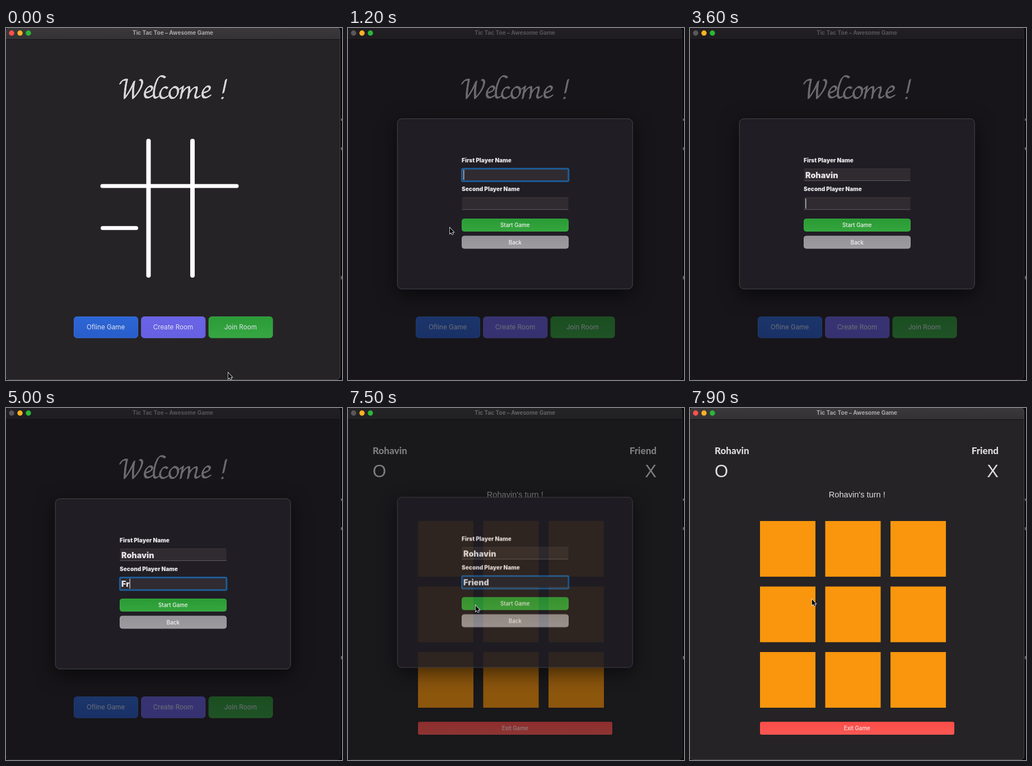
Recreate the animation shown at these times as an HTML page with a canvas. Size 600 by 626 pixels, loop 8000 ms.

```html
<!DOCTYPE html>
<html lang="en">
<head>
<meta charset="utf-8">
<title>Tic Tac Toe</title>
<style>
  html, body { margin: 0; width: 100%; height: 100%; overflow: hidden; background: #000; }
  canvas { display: block; width: 600px; height: 626px; }
</style>
</head>
<body>
<canvas id="stage" role="img" aria-label="Welcome ! Tic Tac Toe"></canvas>
<script>
const W = 600, H = 626, LOOP = 8000, STEP = 100;
const UI = 'Inter, "Open Sans", sans-serif';
const ARIAL = '"Liberation Sans", sans-serif';
const PLAYERS = ['Rohavin', 'Friend'];
const dpr = window.devicePixelRatio || 1;

function setup(canvas) {
  canvas.width = W * dpr;
  canvas.height = H * dpr;
  const c = canvas.getContext('2d');
  c.scale(dpr, dpr);
  return c;
}
const stage = setup(document.getElementById('stage'));
const sheet = setup(document.createElement('canvas'));

const clamp = v => Math.max(0, Math.min(1, v));

function box(c, x, y, w, h, r, fill, stroke) {
  c.beginPath();
  c.roundRect(x, y, w, h, r);
  if (fill) { c.fillStyle = fill; c.fill(); }
  if (stroke) { c.strokeStyle = stroke; c.lineWidth = 1; c.stroke(); }
}

function text(c, str, x, y, font, color, align = 'left') {
  c.font = font;
  c.fillStyle = color;
  c.textAlign = align;
  c.fillText(str, x, y);
}

function shade(c, y, h, top, bottom) {
  const g = c.createLinearGradient(0, y, 0, y + h);
  g.addColorStop(0, top);
  g.addColorStop(1, bottom);
  return g;
}

// Broad-nib lettering
const E = 'M250 115Q262 112 261 106Q259 102 254 105Q247 111 248 119Q250 128 262 120';
const LETTERS = [
  'M204 99Q207 91 216 92Q212 108 212 125Q222 112 229 95Q226 110 227 125Q240 112 243 99Q244 92 239 92',
  E,
  'M284 88Q276 82 271 90Q264 104 264 117Q264 128 272 122',
  'M288 107Q284 103 279 108Q273 116 276 122Q280 128 289 121',
  'M301 105Q292 108 292 117Q293 127 301 124Q309 118 307 109Q305 104 299 105',
  'M311 108L316 104Q314 114 312 125M313 118Q321 104 327 105Q328 110 325 125M326 118Q333 105 340 105Q342 108 338 119Q337 128 346 121',
  'M393 92L388 115M386 124L387 125'
].map(d => new Path2D(d));

function nib(c, path, dx = 0) {
  for (let k = -1; k <= 1; k += 0.25) {
    c.save();
    c.translate(dx + k * 1.2, -k);
    c.stroke(path);
    c.restore();
  }
}

function line(c, x1, y1, x2, y2, w) {
  c.lineWidth = w;
  c.beginPath();
  c.moveTo(x1, y1);
  c.lineTo(x2, y2);
  c.stroke();
}

function welcome(c, t) {
  c.lineCap = c.lineJoin = 'round';
  c.strokeStyle = '#d8d7d9';
  c.lineWidth = 1.2;
  LETTERS.forEach(p => nib(c, p));
  nib(c, LETTERS[1], 103);

  c.strokeStyle = '#fff';
  line(c, 254.5, 201, 254.5, 440, 8);
  line(c, 333, 201, 333, 440, 8);
  line(c, 172, 281, 412, 281, 7);
  line(c, 172.5, 355.8, Math.min(412, 232.5 + t * 0.5), 355.8, 7);

  const items = [
    ['Ofline Game', '#2d67d5', '#285dcb', '#3a70d8'],
    ['Create Room', '#6a64e6', '#6660e2', '#746eea'],
    ['Join Room', '#2b9b37', '#36a743', '#38a544']
  ];
  items.forEach(([label, top, bottom, edge], i) => {
    const x = 121 + i * 120.3;
    box(c, x + 0.5, 513.5, 114, 37.5, 5, shade(c, 513, 38, top, bottom), edge);
    text(c, label, x + 57.2, 536, '400 11.7px ' + UI, '#dfe3ee', 'center');
  });
}

function game(c) {
  const ink = '#dfdee0', names = '800 17px Lato, sans-serif', marks = '31px ' + ARIAL;
  text(c, PLAYERS[0], 44, 82, names, ink);
  text(c, PLAYERS[1], 551, 82, names, ink, 'right');
  text(c, 'O', 44, 123, marks, ink);
  text(c, 'X', 551, 123, marks, ink, 'right');
  text(c, PLAYERS[0] + "'s turn !", 298.3, 159, '14.6px ' + ARIAL, ink, 'center');
  c.fillStyle = '#f9960d';
  for (let i = 0; i < 9; i++)
    c.fillRect(125 + (i % 3) * 116.5, 201 + Math.floor(i / 3) * 116.5, 99, 99);
  box(c, 125, 558, 347, 23, 3, shade(c, 558, 23, '#fb4d49', '#f95853'));
  text(c, 'Exit Game', 298.3, 573.3, '500 9.8px ' + UI, '#f6e6e6', 'center');
}

// [time, letters typed]
const KEYS = [
  [[1200, 0], [2100, 1], [2300, 2], [2500, 3], [2700, 4], [2800, 5], [3000, 6], [3200, 7]],
  [[3600, 0], [4700, 1], [5000, 2], [5500, 3], [5600, 5], [5800, 6], [6000, 6]]
];

function field(c, i, t, focused) {
  const y = 250 + i * 51.3;
  const [last, count] = KEYS[i].filter(k => k[0] <= t).pop() || [t, 0];
  const grow = i ? clamp((t - 3600) / 300) : 1;
  c.fillStyle = '#302b30';
  c.fillRect(203.5, y, 190, 22);
  if (focused && grow > 0) {
    const pad = 7 * (1 - grow);
    c.globalAlpha = grow;
    c.strokeStyle = '#1e5c97';
    c.lineWidth = 3;
    c.beginPath();
    c.roundRect(203.5 - pad, y + 0.2 - pad, 190.3 + 2 * pad, 22.2 + 2 * pad, 2 + pad / 3);
    c.stroke();
    c.globalAlpha = 1;
  } else {
    c.fillStyle = '#3c383d';
    c.fillRect(203.5, y, 190, 1);
    c.fillStyle = '#5c585d';
    c.fillRect(203.5, y + 21, 190, 1);
  }
  const str = PLAYERS[i].slice(0, count);
  text(c, str, 206, y + 17, '900 14.3px ' + UI, '#e4e2e5');
  if (focused && (t - last) % 1000 < 500) {
    c.fillStyle = '#fff';
    c.fillRect(206.3 + c.measureText(str).width, y + 2, 1, 18);
  }
}

function button(c, label, y, top, bottom, edge) {
  box(c, 203.5, y + 0.5, 190, 22, 4, shade(c, y, 22, top, bottom), edge);
  text(c, label, 298.3, y + 15.1, '500 9.8px ' + UI, '#f0f2f0', 'center');
}

function dialog(c, t) {
  c.clearRect(0, 0, W, H);
  c.save();
  c.shadowColor = 'rgba(0,0,0,.65)';
  c.shadowBlur = 34 * dpr;
  c.shadowOffsetY = 9 * dpr;
  box(c, 88, 161, 420.5, 303.5, 8, '#201d24');
  c.restore();
  box(c, 88.2, 161.3, 420, 302.8, 8, null, '#47454a');
  const label = '900 10.1px ' + UI;
  text(c, 'First Player Name', 203, 239.4, label, '#e6e4e7');
  text(c, 'Second Player Name', 203, 290.4, label, '#e6e4e7');
  field(c, 0, t, t < 3600);
  field(c, 1, t, t >= 3600);
  button(c, 'Start Game', 339, '#2a9b35', '#34a63d', '#38a841');
  button(c, 'Back', 369.5, '#949297', '#9d9ba0', '#a19fa4');
}

// [time, x, y]
const MOVES = [
  [0, 396, 612], [100, 396, 612], [700, 202, 535], [1000, 196, 532], [1200, 181, 354],
  [1800, 165, 279], [6700, 165, 279], [6900, 189, 326], [7200, 227, 350],
  [7500, 227, 350], [7900, 217, 339]
];
const ARROW = new Path2D('M0.8 1.2V11.8L3.2 9.6L5 13.2L6.7 12.4L5 8.9H8Z');

function pointer(c, t) {
  if (t >= 2100 && t < 6700) return;
  const i = Math.max(1, MOVES.findIndex(m => m[0] >= t));
  const [t0, x0, y0] = MOVES[i - 1], [t1, x1, y1] = MOVES[i];
  const k = (t - t0) / (t1 - t0);
  c.save();
  c.translate(x0 + (x1 - x0) * k, y0 + (y1 - y0) * k);
  c.lineJoin = 'miter';
  c.lineWidth = 1.6;
  c.strokeStyle = '#e8e8e8';
  c.stroke(ARROW);
  c.fillStyle = '#000';
  c.fill(ARROW);
  c.restore();
}

function frame(c) {
  c.fillStyle = '#0a0a0b';
  c.fillRect(0, 0, W, H);
  c.fillStyle = '#626165';
  c.fillRect(598, 161, 2, 4);
  c.fillRect(598, 212, 2, 5);
  c.fillRect(598, 441, 2, 6);
  c.save();
  c.beginPath();
  c.roundRect(0, -1, 597, 627, 7);
  c.clip();
  c.fillStyle = '#252326';
  c.fillRect(0, 0, W, H);
  c.fillStyle = shade(c, 0, 20, '#3a383b', '#343235');
  c.fillRect(0, 0, W, 20);
  c.fillStyle = '#111013';
  c.fillRect(0, 20, W, 1);
  c.restore();
  box(c, -0.5, -0.5, 597, 626, 7, null, '#454447');
  text(c, 'Tic Tac Toe – Awesome Game', 298, 12.4, '700 10px ' + UI, '#aaa8ab', 'center');
}

function lights(c, modal) {
  [modal ? '#5a585b' : '#fe514c', '#fdb224', '#2ab838'].forEach((color, i) => {
    c.fillStyle = color;
    c.beginPath();
    c.arc(10 + i * 15, 9, 4.7, 0, 7);
    c.fill();
  });
}

function draw(t) {
  const c = stage;
  const closing = clamp((t - 7460) / 300);
  const shown = clamp((t - 950) / 250) * (1 - closing);
  frame(c);
  if (t < 7400) welcome(c, t); else game(c);
  if (shown > 0) {
    c.globalAlpha = shown;
    c.fillStyle = 'rgba(13,11,14,.53)';
    c.fillRect(0, 0, 597, H);
    dialog(sheet, t);
    c.drawImage(sheet.canvas, 0, -20 * (t < 4000 ? 1 - shown : closing), W, H);
    c.globalAlpha = 1;
  }
  lights(c, shown > 0);
  pointer(c, t);
}

const start = performance.now();
function tick() {
  const t = (performance.now() - start) % LOOP;
  draw(Math.floor(t / STEP) * STEP);
  requestAnimationFrame(tick);
}
tick();
</script>
</body>
</html>
```
